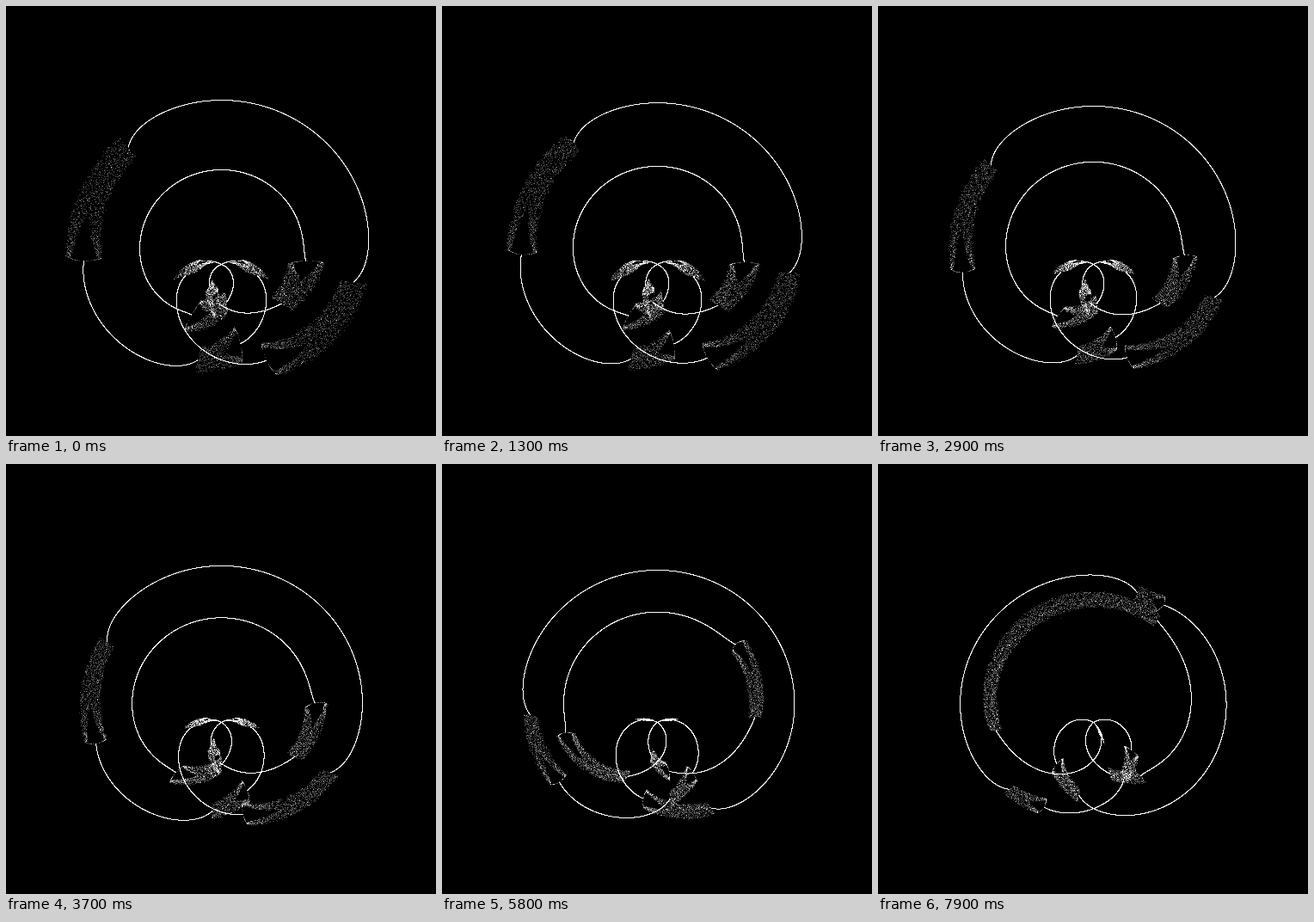
Write an HTML page with a canvas that moves like this. It is 500 px wide and 500 px high and loops after 8000 ms.

```html
<!DOCTYPE html>
<html lang="en">
<head>
<meta charset="utf-8">
<title>Branching spirals</title>
<style>
  html, body { margin: 0; width: 100%; height: 100%; overflow: hidden; background: #000; }
  canvas { display: block; width: 500px; height: 500px; }
</style>
</head>
<body>
<canvas id="stage" width="500" height="500"></canvas>
<script>
const SIZE = 500, CX = 250, CY = 300;
const LOOP = 8000, STEP = 100, LAST = LOOP / STEP - 1;
const PER_DEGREE = 24;  // samples along a spiral
const GLOW = 64;        // light added by one sample
const FORK = 1.5;       // degrees over which the line splits
const TURN = 0.13;      // share of the loop at which the bands turn back

const ctx = document.getElementById('stage').getContext('2d');
const image = ctx.createImageData(SIZE, SIZE);
const pixels = new Uint32Array(image.data.buffer);
const light = new Uint8ClampedArray(SIZE * SIZE);

const mix = (a, b, k) => a + (b - a) * k;

// A scattered stretch: each edge, in degrees from the top, moves at its own rate.
const band = (side, near, nearRate, far, farRate) => ({ side, near, nearRate, far, farRate });

// Both spirals follow r = size * cos(angle) stretched to reach zero at `reach`.
const outer = {
  size: [191, 172], reach: [300, 300], sag: 0.07, forkFar: true,
  drift: s => 118 * Math.abs(s - TURN) ** 1.6,
  opening: () => 1,
  bands: [
    band(-1, 34, 1, 84, 0.68),
    band(1, 93, 1.04, 150, 0.74),
    band(-1, 164, 0.48, 190, 0.45),
    band(-1, 250, 0.53, 279, 0.3),
    band(1, 250, 0.53, 279, 0.3),
    band(1, 44.6, -0.275, 3.4, 0.275)
  ]
};

const inner = {
  size: [110, 135], reach: [250, 228], sag: -0.06, forkFar: false,
  drift: s => 153 * Math.abs(s - TURN) ** 2.5,
  opening: s => 1 - s ** 6,
  bands: [
    band(1, 90, -1, 124, -0.85),
    band(-1, 152, -1.25, 189, -0.87),
    band(1, 188, -0.46, 210, -0.44),
    band(-1, 250, -0.4, 200, 0.24)
  ]
};

function makeRandom(seed) {
  let s = Math.imul(seed, 7919) >>> 0;
  return () => {
    s = (s + 0x6D2B79F5) >>> 0;
    let z = Math.imul(s ^ s >>> 15, s | 1);
    z ^= z + Math.imul(z ^ z >>> 7, z | 61);
    return ((z ^ z >>> 14) >>> 0) / 4294967296;
  };
}

function plot(degrees, r) {
  const a = degrees * Math.PI / 180;
  const x = Math.round(CX + r * Math.sin(a)), y = Math.round(CY - r * Math.cos(a));
  light[y * SIZE + x] += GLOW;
}

// Radial scatter, in band widths, at `d` degrees inside the forked edge.
function scatter(d, span, opening, random) {
  const sign = random() < 0.5 ? -1 : 1;
  if (d < -FORK || d > span) return 0;
  if (d < 0) return sign * opening * Math.sqrt(1 + d / FORK);
  const u = d / span;
  const gap = 0.8 * opening * Math.max(0, 1 - u / 0.38);
  const edge = (1 - 0.25 * u) * mix(0.9, 1.1, random());
  return sign * edge * mix(gap, 1, random());
}

function drawSpiral(spiral, s, random) {
  const size = mix(...spiral.size, s), reach = mix(...spiral.reach, s);
  const drift = spiral.drift(s), opening = spiral.opening(s);
  const bandWidth = 10 * (1 + (1 - s) ** 2);
  const bands = spiral.bands.map(b => {
    const near = b.near + b.nearRate * drift;
    return { side: b.side, near, span: b.far + b.farRate * drift - near };
  }).filter(b => b.span > 0);

  for (let angle = -reach; angle <= reach; angle += 1 / PER_DEGREE) {
    const r = size * Math.cos(angle / reach * Math.PI / 2);
    const width = Math.min(bandWidth, r * 0.4);
    let sag = 0, offset = 0;
    for (const b of bands) {
      const d = angle * b.side - b.near, past = d - b.span;
      // The line bends towards a band and recovers beyond it.
      const pull = d < 0 ? Math.exp(d / 6) : past > 0 ? Math.exp(-past / 15) : 1;
      sag = Math.max(sag, pull);
      offset += width * scatter(spiral.forkFar ? -past : d, b.span, opening, random);
    }
    plot(angle, r * (1 - spiral.sag * sag) + offset);
  }
}

function draw(frame) {
  const random = makeRandom(frame + 1), s = frame / LAST;
  light.fill(0);
  drawSpiral(outer, s, random);
  drawSpiral(inner, s, random);
  for (let i = 0; i < light.length; i++) pixels[i] = 0xff000000 | light[i] * 0x010101;
  ctx.putImageData(image, 0, 0);
}

const start = performance.now();
let shown = -1;
function tick() {
  const frame = Math.floor((performance.now() - start) % LOOP / STEP);
  if (frame !== shown) draw(shown = frame);
  requestAnimationFrame(tick);
}
tick();
</script>
</body>
</html>
```
